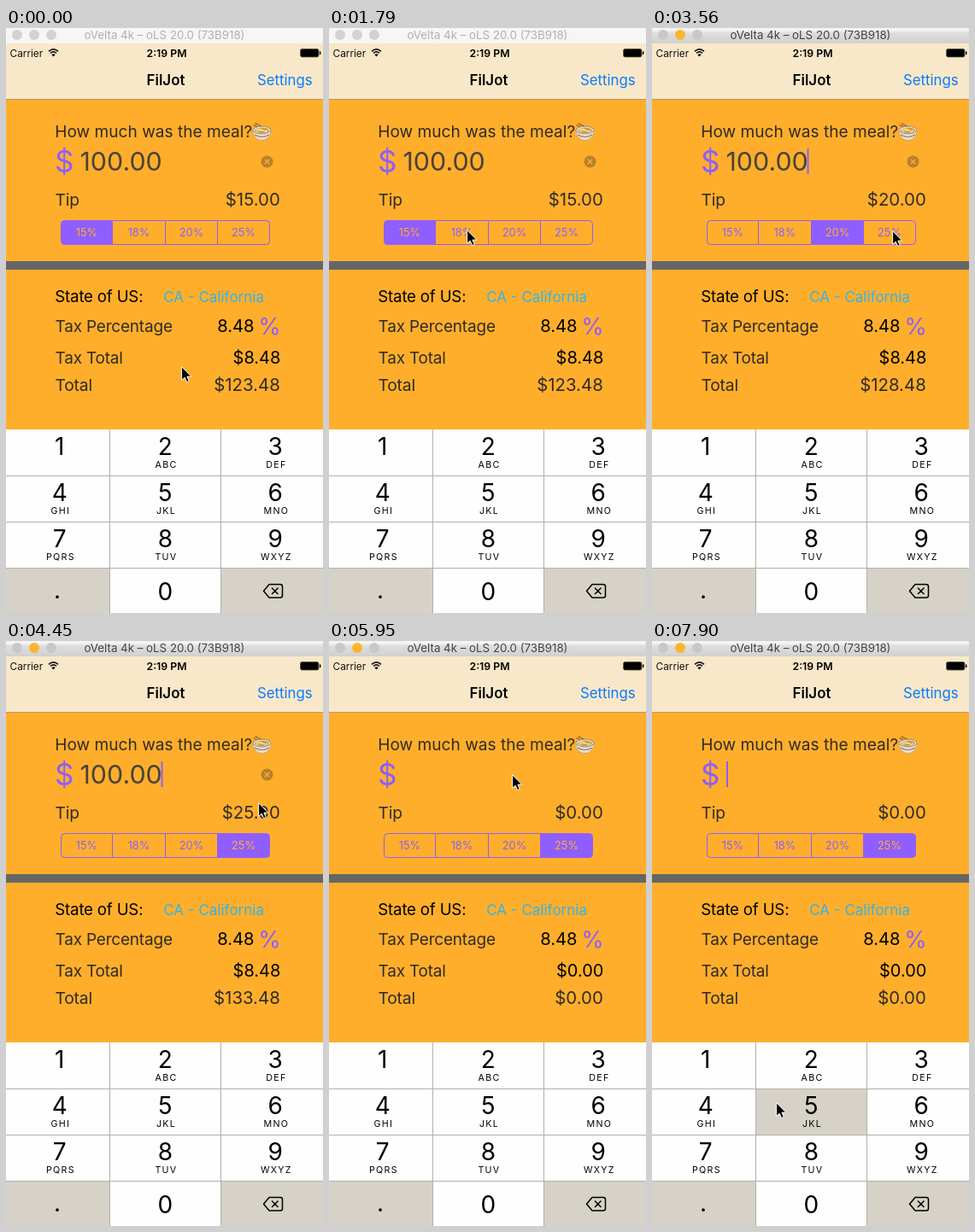
Animation, 371 px wide and 685 px high, one loop 8 s. Source, as an HTML page:

```html
<!DOCTYPE html>
<html lang="en">
<head>
<meta charset="utf-8">
<title>Tip calculator</title>
<style>
  html, body { margin: 0; width: 100%; height: 100%; overflow: hidden; background: #ffae2b; }
  svg { display: block; width: 100%; height: 100%; font-family: Inter, "Open Sans", sans-serif; }
  text { white-space: pre; }
</style>
</head>
<body>
<svg id="stage" viewBox="0 0 371 685">
  <defs>
    <linearGradient id="bar" x2="0" y2="1">
      <stop offset=".15" stop-color="#f4f4f4"/><stop offset=".32" stop-color="#dedede"/><stop offset="1" stop-color="#d0d0d0"/>
    </linearGradient>
  </defs>
</svg>
<script>
const stage = document.getElementById('stage');
const PURPLE = '#8f5eff', ORANGE = '#ffae2b', DARK = '#302b25', GREY = '#d6d2c7';

function add(tag, attrs, content = '') {
  const el = document.createElementNS('http://www.w3.org/2000/svg', tag);
  for (const k in attrs) el.setAttribute(k, attrs[k]);
  el.textContent = content;
  stage.append(el);
  return el;
}
const rect = (x, y, width, height, fill, more) => add('rect', { x, y, width, height, fill, ...more });
const text = (s, x, y, size, fill, more) => add('text', { x, y, 'font-size': size, fill, ...more }, s);
const path = (d, stroke, width, more) => add('path', { d, stroke, 'stroke-width': width, fill: 'none', ...more });
const mid = { 'text-anchor': 'middle' }, end = { 'text-anchor': 'end' };
const bold = { ...mid, 'font-weight': 600 };

// Window title
const bar = rect(0, 0, 371, 18, '#f6f6f6');
const lights = [13, 33, 53].map(cx => add('circle', { cx, cy: 8, r: 6, fill: '#d2d2d2' }));
const title = text('oVelta 4k – oLS 20.0 (73B918)', 185.5, 13, 13.3, '#b0b0b0', mid);

// Status and navigation bars
rect(0, 18, 371, 65, '#f8e8c9');
rect(0, 83, 371, 1, '#b99a64');
text('Carrier', 4.6, 33.5, 11.8, '#111');
path('M50 27.3Q55.5 22.3 61 27.3M52 29.5Q55.5 26.3 59 29.5', '#111', 1.6);
path('M53.3 31.2Q55.5 29.4 57.7 31.2L55.5 33.5Z', 'none', 0, { fill: '#111' });
text('2:19 PM', 188, 33.5, 12.3, '#000', bold);
rect(344.5, 24.5, 21.5, 9.5, '#000', { rx: 2, stroke: '#5c5548', 'stroke-width': .8 });
rect(367, 27.3, 1.4, 4, '#000', { rx: .7 });
text('FilJot', 187, 67, 16.9, '#000', bold);
text('Settings', 294, 67, 16.8, '#0a7aff');

// Meal
text('How much was the meal?', 57.3, 128, 19.1, DARK);
path('M289.5 113.5L302 119M291.5 111.5L304 118', '#8a5a34', 1.2);
path('M289 120C289 127 294 131.5 299.5 131.5S310 127 310 120Z', '#a59684', .6, { fill: '#e6e0d4' });
path('M291 125Q299.5 130 308 125', '#a8705a', 1.2);
add('ellipse', { cx: 299.5, cy: 119.5, rx: 10.3, ry: 4.4, fill: '#f4efe6', stroke: '#86705a', 'stroke-width': .8 });
add('ellipse', { cx: 299.5, cy: 119.8, rx: 8.6, ry: 3.2, fill: '#c79a45' });
path('M292 119.5Q296 117 300 119.5T306 119.5M293 121Q298 118.5 305 121.5', '#f3dc90', 1.4);

text('$', 57, 168.5, 35, PURPLE);
const amount = text('100.00', 86.5, 167, 30.4, '#494239');
const clear = add('g', {});
clear.append(
  add('circle', { cx: 305.5, cy: 156.5, r: 7, fill: '#b8812f' }),
  path('M302.8 153.8L308.2 159.2M308.2 153.8L302.8 159.2', ORANGE, 1.3));
const caret = rect(0, 141, 2, 30, PURPLE);
const label = { 'letter-spacing': -.2 };
text('Tip', 57.6, 207.7, 19.2, DARK, label);
const tip = text('', 320.8, 207.7, 20.4, DARK, end);

// Tip rate selector
const rates = [15, 18, 20, 25];
const edges = [64.5, 124.5, 186.5, 247.5, 308.5];
const segments = rates.map((r, i) => {
  const a = edges[i], b = edges[i + 1];
  const l = i ? 0 : 4, e = i < 3 ? 0 : 4;
  const box = path(`M${a + l} 225.5H${b - e}q${e} 0 ${e} ${e}V${253.5 - e}q0 ${e} ${-e} ${e}H${a + l}q${-l} 0 ${-l} ${-l}V${225.5 + l}q0 ${-l} ${l} ${-l}Z`, PURPLE, 1);
  return { box, name: text(r + '%', (a + b) / 2, 244, 12.8, PURPLE, mid) };
});

// Tax and total
rect(0, 273, 371, 10, '#666');
text('State of US:', 57.3, 321, 18.7, '#000', label);
text('CA - California', 184.2, 321, 17, '#36b3e6');
text('Tax Percentage', 57.5, 356, 19, DARK, label);
text('8.48', 290.6, 356, 20.2, '#000', end);
text('%', 308.5, 359, 27, PURPLE, mid);
text('Tax Total', 57.5, 393, 19, DARK, label);
const tax = text('', 321.4, 393, 20, '#000', end);
text('Total', 57.5, 425.3, 19.3, DARK, label);
const total = text('', 320.8, 425.3, 20.4, DARK, end);

// Keypad
rect(0, 470, 371, 215, '#fefefe');
rect(0, 632, 121.5, 53, GREY);
rect(251.5, 632, 119.5, 53, GREY);
const pressed = rect(121.5, 524.5, 130, 54, GREY);
path('M0 524.5H371M0 578.5H371M0 632.5H371M121.5 470V685M251.5 470V685', '#b3b0aa', 1);
const letters = ['', 'ABC', 'DEF', 'GHI', 'JKL', 'MNO', 'PQRS', 'TUV', 'WXYZ'];
letters.forEach((s, i) => {
  const x = [62.7, 186.3, 315.2][i % 3], y = 500 + 54 * Math.floor(i / 3);
  text(i + 1, x, y, 28, '#000', mid);
  text(s, x + 1.2, y + 15, 10.7, '#000', { ...mid, 'letter-spacing': 1.3 });
});
text('0', 186.3, 670, 28, '#000', mid);
text('.', 60, 668, 28, '#000', mid);
path('M308 651.5H321Q323.5 651.5 323.5 654V664.5Q323.5 667 321 667H308L301.5 659.2ZM311 655.5L318.5 663M318.5 655.5L311 663',
  '#000', 1.5, { 'stroke-linejoin': 'round' });

const pointer = path('M-.4 -.4V15.3L3.2 12.2L5.7 17.6L8.3 16.5L5.9 11.1H10.8Z', '#fff', 1, { fill: '#000' });

const LOOP = 8000, TICK = 148.7;
const pauses = [13, 29, 41, 48];
const stops = [
  [0, 206, 397], [5, 218, 90], [12, 162, 237], [15, 162, 237], [18, 215, 237],
  [21, 216, 238], [24, 282, 238], [28, 283, 238], [30, 296, 190], [33, 299, 154],
  [35, 299, 155], [36, 293, 157], [40, 215, 157], [41, 215, 157], [47, 150, 517],
  [48, 150, 517], [52, 146, 541], [54, 146, 541]
];
const ACTIVE = 14, TAPS = [15, 20, 26], CLEAR = 35, PRESS = 53;

function pointerAt(n) {
  const i = Math.max(1, stops.findIndex(s => s[0] >= n));
  const [n0, x0, y0] = stops[i - 1], [n1, x1, y1] = stops[i];
  const u = (n - n0) / (n1 - n0), k = u * u * (3 - 2 * u);
  return [x0 + (x1 - x0) * k, y0 + (y1 - y0) * k];
}

const money = v => '$' + v.toFixed(2);

function draw(ms) {
  let n = Math.floor((ms + 12) / TICK);
  if (pauses.includes(n)) n--;

  const active = n >= ACTIVE, empty = n >= CLEAR;
  bar.setAttribute('fill', active ? 'url(#bar)' : '#f6f6f6');
  title.setAttribute('fill', active ? '#444' : '#b0b0b0');
  lights.forEach((l, i) => l.setAttribute('fill', active ? (i === 1 ? '#fdb52b' : '#c8c8c8') : '#d2d2d2'));

  const pick = TAPS.filter(t => n >= t).length;
  segments.forEach((s, i) => {
    s.box.setAttribute('fill', i === pick ? PURPLE : 'none');
    s.name.setAttribute('fill', i === pick ? ORANGE : PURPLE);
  });

  const meal = empty ? 0 : 100;
  const tipSum = meal * rates[pick] / 100, taxSum = meal * .0848;
  tip.textContent = money(tipSum);
  tax.textContent = money(taxSum);
  total.textContent = money(meal + tipSum + taxSum);
  amount.setAttribute('opacity', empty ? 0 : 1);
  clear.setAttribute('opacity', empty ? 0 : 1);

  const blink = (n * TICK / 1000 + 1 - (empty ? .441 : .2)) % 1;
  caret.setAttribute('x', empty ? 87 : 181.5);
  caret.setAttribute('opacity', blink < .45 ? 1 : blink < .5 ? .25 : 0);

  pressed.setAttribute('opacity', n >= PRESS ? 1 : 0);
  pointer.setAttribute('transform', `translate(${pointerAt(n)})`);
}

const start = performance.now();
function loop(now) {
  draw(Math.max(0, now - start) % LOOP);
  requestAnimationFrame(loop);
}
draw(0);
requestAnimationFrame(loop);
</script>
</body>
</html>
```
